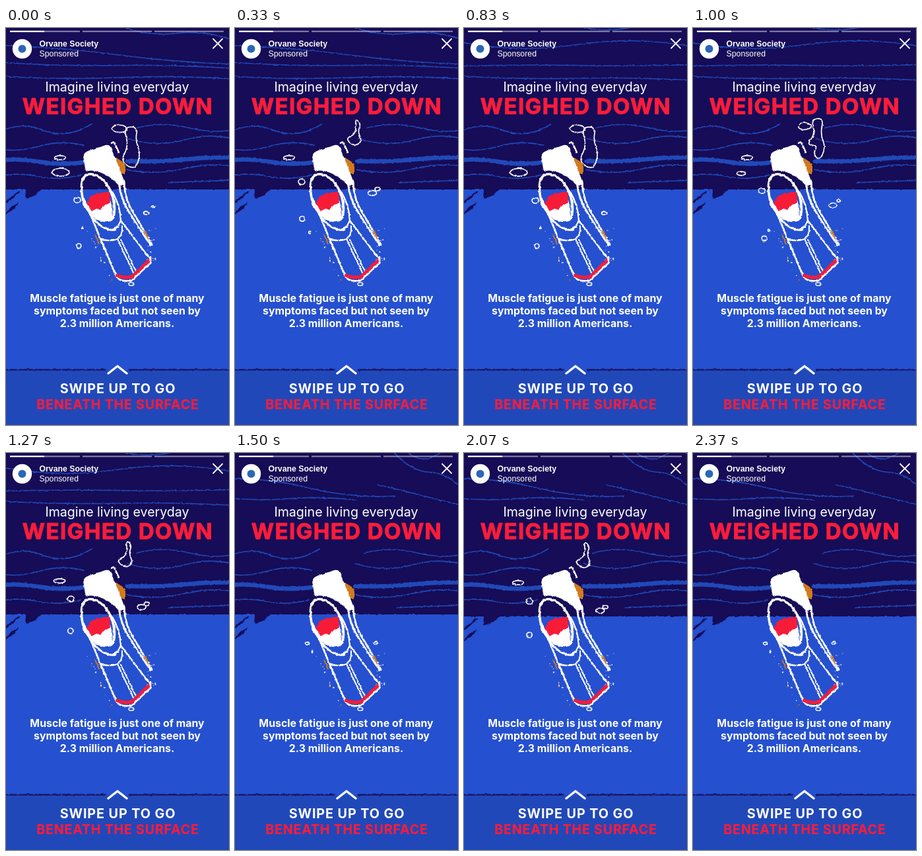
An HTML page that plays this animation: 338x600 px, repeating every 2.5 s.

```html
<!DOCTYPE html>
<html lang="en">
<head>
<meta charset="utf-8">
<title>Weighed Down</title>
<style>
  html, body { margin: 0; width: 100%; height: 100%; overflow: hidden; background: #2550cf; }
  svg { display: block; width: 338px; height: 600px; }
  text { font-family: Inter, sans-serif; font-weight: 700; fill: #fff; }
  .mid { text-anchor: middle; }
  .ui { font-family: "Liberation Sans", Arial, sans-serif; font-size: 12.3px; }
  .light { font-weight: 400; }
  .red { fill: #fc1c3a; stroke: #fc1c3a; stroke-linejoin: round; }
  .line { fill: none; stroke: #fff; stroke-linecap: round; stroke-linejoin: round; }
  .wave path { fill: none; stroke: #2049b9; stroke-width: 1.7; stroke-linecap: round; }
  .wave .band { stroke-width: 6.5; }
  .ink { fill: #160c57; }
  .orange { fill: #d27a1c; }
</style>
</head>
<body>
<svg viewBox="0 0 338 600">
  <defs>
    <filter id="rough" filterUnits="userSpaceOnUse" x="-20" y="-20" width="378" height="640" color-interpolation-filters="sRGB">
      <feTurbulence type="fractalNoise" baseFrequency=".22" numOctaves="2" seed="4"/>
      <feDisplacementMap in="SourceGraphic" scale="3" xChannelSelector="R" yChannelSelector="G"/>
    </filter>
  </defs>

  <rect width="338" height="600" fill="#2550cf"/>
  <rect y="517" width="338" height="83" fill="#2148b9"/>
  <g filter="url(#rough)">
    <rect id="sea" class="ink" x="-10" y="-10" width="358" height="254"/>
    <g id="waves"></g>
    <g id="shore" class="ink">
      <path d="M30 244H54L42 254L29 258Z"/>
      <path d="M-4 284L8 270L20 264L13 273Z"/>
      <path d="M-4 265L18 247H22L2 264Z"/>
    </g>
    <path d="M-5 516.5H152M186 516.5H345" stroke="#160c57" stroke-width="2"/>
  </g>

  <g filter="url(#rough)">
    <path class="orange" d="M164 195Q176 199 181 209V220H172Z"/>
    <path fill="#fff" d="M117 194Q118 188 126 185L151 177Q157 176 159 181L173 215L181 236L172 239Q157 222 139 217Q128 214 121 217Z"/>
    <path class="line" stroke-width="2.8" d="M171 234Q174 257 184 274T219 328M179 232Q180 258 191 276T221 327"/>
    <path class="orange" d="M208 306H212L219 326Z"/>
    <path fill="#fff" d="M118 261Q127 274 140 263Q151 256 158 260Q164 278 160 290Q143 294 131 282Z"/>
    <path class="line" stroke-width="3.6" d="M119 270Q111 240 117 227Q124 217 137 223Q153 231 160 250T163 286Q158 293 147 291Q129 287 118 265"/>
    <path class="line" stroke-width="2.4" d="M120 265Q131 296 153 304Q168 308 174 291Q173 267 160 246M133 288Q151 309 166 305M174 291Q184 304 219 350"/>
    <path class="line" stroke-width="2.6" d="M118 258L143 318L167 375Q171 384 190 382L219 355V346"/>
    <path class="line" stroke-width="2" d="M143 318Q155 324 169 319Q177 314 176 299M169 319L195 374M174 320L198 370"/>
    <path d="M166 373Q179 379 191 376L218 350" fill="none" stroke="#f61c38" stroke-width="5.2"/>
    <path fill="#f61c38" d="M122 265L129 254L137 250L157 247L158 264L147 269L143 275L137 273L130 277Z"/>
    <path class="orange" d="M134 312l3 2l5 13h-2Z"/>
    <ellipse class="line" cx="190" cy="387" rx="4" ry="2.4" stroke-width="1.4"/>
    <g id="specks"></g>
  </g>

  <g id="bubbles" class="line" stroke-width="1.7" filter="url(#rough)"></g>

  <g fill="#fff">
    <path d="M6 4h52v2.2H6z"/>
    <path d="M58 4h54v2.2H58zM116 4h105v2.2H116zM225 4h105v2.2H225z" opacity=".45"/>
    <circle cx="24.5" cy="31.5" r="14.7"/>
  </g>
  <circle cx="24.5" cy="31.5" r="6" fill="#2a67b5"/>
  <text class="ui" x="50.5" y="28">Orvane Society</text>
  <text class="ui light" x="50.5" y="43">Sponsored</text>
  <path class="line" stroke-width="1.8" d="M314 16.5l14 14m0-14l-14 14"/>

  <text class="mid light" x="168.5" y="96" font-size="19.6">Imagine living everyday</text>
  <text class="mid red" x="169.5" y="129.5" font-size="33" letter-spacing="1.4" stroke-width="1">WEIGHED DOWN</text>
  <g class="mid" font-size="15.9">
    <text x="168.5" y="413.5">Muscle fatigue is just one of many</text>
    <text x="168.5" y="432.5">symptoms faced but not seen by</text>
    <text x="168.5" y="451.5">2.3 million Americans.</text>
  </g>
  <path class="line" stroke-width="3.4" d="M155 522l14-11l14 11"/>
  <text class="mid" x="169.5" y="552" font-size="19.8" letter-spacing=".9">SWIPE UP TO GO</text>
  <text class="mid red" x="169.5" y="576" font-size="19.6" letter-spacing=".8" stroke-width=".2">BENEATH THE SURFACE</text>
</svg>

<script>
const LOOP = 2500, CYCLES = 3;
const $ = id => document.getElementById(id);

function add(parent, tag, attrs) {
  const el = document.createElementNS("http://www.w3.org/2000/svg", tag);
  for (const k in attrs) el.setAttribute(k, attrs[k]);
  return parent.appendChild(el);
}
const show = (el, on) => el.setAttribute("visibility", on ? "visible" : "hidden");

// Moments, in hundredths of a second, at which the held drawing advances
const steps = [0, 3, 7, 10, 13, 17, 33, 40, 50, 57, 63, 67, 83, 87, 90, 93, 97,
  100, 110, 117, 123, 127, 133, 140, 143, 147, 150, 157, 167, 173, 177, 184, 190,
  200, 207, 213, 217, 220, 234, 237];

// A wave from x0 to x1 that starts at y, bends by b and ends lower by d
const ripple = ([x0, x1, y, b, d]) => {
  const w = x1 - x0;
  return `M${x0} ${y}q${w / 4} ${b} ${w / 2} ${d / 2}t${w / 2} ${d / 2}`;
};
const ripples = rows => rows.map(ripple).join("");

const lower = ripples([
  [-20, 130, 163, -24, -18], [198, 358, 151, -10, 0],
  [-20, 118, 181, 8, -4], [184, 358, 167, 14, 4],
  [-20, 114, 226, -9, -4], [182, 358, 214, 9, -3], [246, 358, 234, -2, -5]
]);
const bands = ripples([[-20, 118, 201, -5, 2], [184, 358, 201, 2, -5]]);
const upper = [
  { until: 570, rows: [[-20, 358, 26, 2, 29], [160, 358, -8, 22, 32], [-20, 358, 51, 7, 11], [-20, 358, 72, 7, 6]] },
  { until: 1400, rows: [[-20, 358, 19, 20, 12], [150, 358, -8, 18, 13], [-20, 358, 58, -3, -3], [-20, 358, 72, 6, 8]] },
  { until: LOOP, rows: [[236, 358, -8, 36, 74], [256, 358, -8, 27, 22], [218, 358, 48, 8, 34], [-20, 245, 40, -4, 25], [-20, 185, 67, 6, 4]] }
];
const waveSets = upper.map(({ until, rows }) => {
  const g = add($("waves"), "g", { class: "wave" });
  add(g, "path", { d: ripples(rows) + lower });
  add(g, "path", { d: bands, class: "band" });
  return { g, until };
});

// Paint flecks along the two sides of the blade
let seed = 7;
const rand = () => (seed = seed * 16807 % 2147483647) / 2147483647;
for (let i = 0; i < 34; i++) {
  const left = i % 2, u = rand();
  add($("specks"), "circle", {
    cx: left ? 126 + u * 40 - rand() * 6 : 213 + rand() * 15,
    cy: left ? 300 + u * 92 : 303 + u * 52,
    r: .4 + rand() * .6,
    fill: left && i % 3 === 0 ? "#d27a1c" : "#fff"
  });
}

// Each key: phase, x, y, size
const bubbles = [
  { rx: 5, ry: 4.2, keys: [[.87, 110, 288, .5], [1, 108, 260, 1], [1.4, 101, 232, 1], [1.78, 93, 197, 1]] },
  { rx: 6.5, ry: 3.8, keys: [[.87, 213, 287, .45], [1.2, 212, 268, .9], [1.4, 208, 249, 1], [1.78, 200, 200, 1]] },
  { rx: 4, ry: 2.6, keys: [[1.1, 223, 270, .5], [1.4, 216, 243, 1], [1.78, 208, 197, 1]] },
  { rx: 13, ry: 6, keys: [[.93, 84, 221, .9], [1, 83, 218, 1], [1.22, 72, 220, .45]] },
  { rx: 12, ry: 4.5, keys: [[1.5, 82, 196, .7], [1.78, 71, 165, 1]] },
  { rx: 4.2, ry: 4, keys: [[.95, 111, 332, .8], [1.2, 108, 318, .9], [1.55, 97, 265, 1]] },
  { rx: 1.7, ry: 2, keys: [[.87, 117, 300, .5], [1.45, 113, 310, 1]] }
].map(b => ({ ...b, el: add($("bubbles"), "ellipse", {}) }));

function sample(keys, p) {
  if (p < keys[0][0]) p++;
  const i = keys.findIndex(k => k[0] >= p);
  if (i < 1) return i ? null : keys[0];
  const a = keys[i - 1], b = keys[i], u = (p - a[0]) / (b[0] - a[0]);
  return a.map((v, j) => v + (b[j] - v) * u);
}

// Closed soft outline around a few points
function blob(text) {
  const pts = text.split(" ").map(s => s.split(",").map(Number));
  const mid = i => pts[i].map((v, j) => (v + pts[(i + 1) % pts.length][j]) / 2);
  return `M${mid(pts.length - 1)}` + pts.map((p, i) => `Q${p} ${mid(i)}`).join("") + "Z";
}

// Air plumes, each seen during part of the cycle and placed at its rest phase
const plumes = [
  [-.13, .1, 0, "158,153 167,145 184,149 182,157 168,158", "178,150 200,149 196,169 204,190 196,215 173,202 186,178"],
  [.1, .3, .2, "157,150 167,140 183,149 169,155", "179,138 198,136 193,160 201,180 192,201 182,190 189,177 172,177 185,160"],
  [.3, .58, .396, "182,136 191,145 186,156 193,172 180,179 167,167 184,160"]
].map(([from, to, rest, ...shapes]) =>
  ({ from, to, rest, el: add($("bubbles"), "path", { d: shapes.map(blob).join("") }) }));
const nub = add($("bubbles"), "path", { d: "M160 174q5-4 6 3l5 11", "stroke-width": 2.4 });

function draw(t) {
  const phase = t * CYCLES / LOOP % 1;
  const newborn = phase > .79 && phase < .87;

  const current = waveSets.find(s => t < s.until);
  for (const s of waveSets) show(s.g, s === current);
  current.g.setAttribute("transform", `translate(${3 * Math.sin(t / LOOP * 2 * Math.PI)})`);
  const level = t >= 1770 ? 3 : 0;
  $("sea").setAttribute("height", 254 + level);
  $("shore").setAttribute("transform", `translate(0 ${level})`);

  for (const { keys, rx, ry, el } of bubbles) {
    const s = sample(keys, newborn ? .87 : phase);
    show(el, s);
    if (!s) continue;
    const [, cx, cy, size] = s;
    const attrs = { cx, cy, rx: rx * size, ry: ry * size };
    for (const k in attrs) el.setAttribute(k, attrs[k]);
  }
  for (const p of plumes) {
    const q = phase > .87 ? phase - 1 : phase;
    show(p.el, q >= p.from && q < p.to);
    p.el.setAttribute("transform", `translate(0 ${(p.rest - q) * 40})`);
  }
  show(nub, !newborn);
}

let last = -1;
function tick() {
  const now = performance.now() % LOOP;
  const step = steps.findLast(s => s * 10 <= now);
  if (step !== last) draw((last = step) * 10);
  requestAnimationFrame(tick);
}
tick();
</script>
</body>
</html>
```
